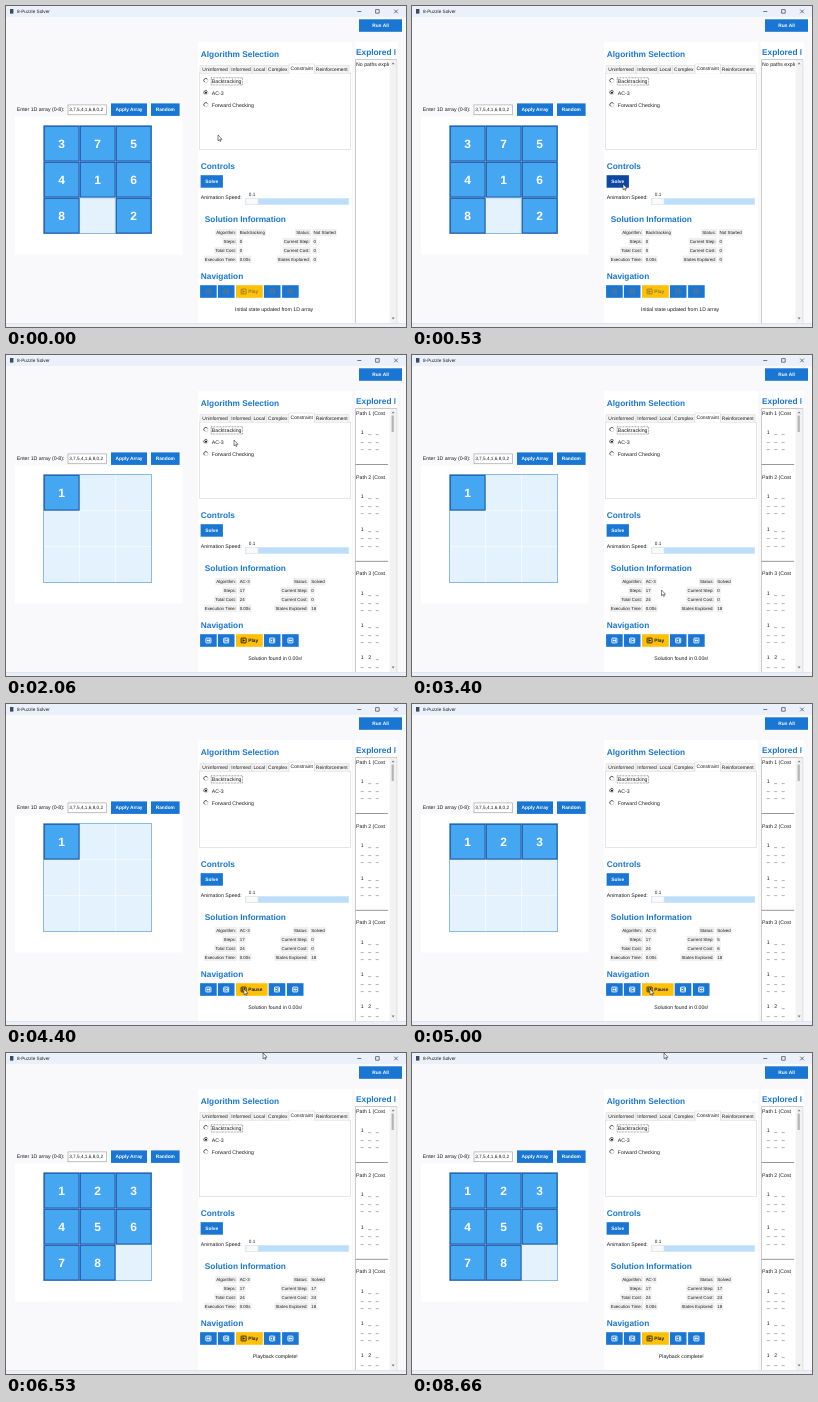
Recreate the animation shown at these times as an HTML page. Size 400 by 321 pixels, loop 8730 ms.

```html
<!DOCTYPE html>
<html lang="en">
<head>
<meta charset="utf-8">
<title>8-Puzzle Solver</title>
<style>
  html, body { margin: 0; width: 100%; height: 100%; overflow: hidden; background: #f9f9fc; }
  svg { display: block; width: 100vw; height: 100vh; }
  text { font-family: "Liberation Sans", Arial, sans-serif; font-size: 5.2px; fill: #1c1c1c;
         text-rendering: geometricPrecision; white-space: pre; }
  .head { font-size: 8.3px; font-weight: bold; fill: #1976d2; }
  .btn { font-size: 4.8px; font-weight: bold; fill: #fff; text-anchor: middle; }
  .tab { font-size: 4.9px; }
  .small { font-size: 4.7px; }
  .info { font-size: 4.4px; }
  .num { font-size: 12px; font-weight: bold; fill: #fff; text-anchor: middle; }
  .mid { text-anchor: middle; }
</style>
</head>
<body>
<svg id="stage" viewBox="0 0 400 321" preserveAspectRatio="none">
  <defs>
    <clipPath id="listClip"><rect x="349" y="36" width="34" height="281"/></clipPath>
    <clipPath id="headClip"><rect x="349" y="36" width="40.6" height="17"/></clipPath>
  </defs>
</svg>
<script>
const LOOP = 8730, TICK = 1000 / 15;
const SOLVED = 930, PLAY = 4400, LAST = 6400, DONE = 6500;
const BLUE = '#1976d2', NAVY = '#0d47a1', AMBER = '#ffc107';
const svg = document.getElementById('stage');

function el(name, attrs, parent = svg) {
  const node = document.createElementNS('http://www.w3.org/2000/svg', name);
  for (const key in attrs) node.setAttribute(key, attrs[key]);
  parent.appendChild(node);
  return node;
}
const group = (attrs = {}, parent = svg) => el('g', attrs, parent);
const rect = (x, y, width, height, fill, parent, extra = {}) =>
  el('rect', { x, y, width, height, fill, ...extra }, parent);
const path = (d, attrs, parent) => el('path', { d, fill: 'none', ...attrs }, parent);
function text(x, y, str, cls = '', parent) {
  const node = el('text', { x, y, class: cls }, parent);
  node.textContent = str;
  return node;
}
function setText(node, str) {
  if (node.textContent !== String(str)) node.textContent = str;
}
function show(node, on) { node.setAttribute('visibility', on ? 'visible' : 'hidden'); }
function shift(node, x, y = 0) { node.setAttribute('transform', `translate(${x} ${y})`); }
function button(x, y, w, label, h = 12.5) {
  const face = rect(x, y, w, h, BLUE);
  text(x + w / 2, y + h / 2 + 1.7, label, 'btn');
  return face;
}

// Window frame
rect(0, 0, 400, 321, '#f9f9fc');
rect(0, 0, 400, 11, '#eaf1fa');
rect(4, 3, 3.4, 4.6, '#3b4a5c');
text(11, 7.2, '8-Puzzle Solver', 'small');
path('M351.3 5.5h4M369.6 3.6h3.6v3.6h-3.6zM388.2 3.6l3.7 3.7m0 -3.7l-3.7 3.7',
  { stroke: '#333', 'stroke-width': 0.65 });
rect(0, 317.5, 400, 3.5, '#eaeff8');
rect(0, 317.2, 400, 0.7, '#d8dee8');
button(353, 13.3, 43, 'Run All');

// Left side
text(10.8, 105.4, 'Enter 1D array (0-8):');
rect(62, 98.9, 38.6, 9.8, '#fff', svg, { stroke: '#a8a8a8', 'stroke-width': 0.7 });
text(63.2, 105.3, '3,7,5,4,1,6,8,0,2', 'small');
rect(9, 110.5, 167.5, 138, '#fff');
button(105, 97.4, 36, 'Apply Array');
button(145, 97.4, 28.6, 'Random');

rect(37.6, 119.6, 108, 108, '#e3f2fd', svg, { stroke: '#74abdb', 'stroke-width': 0.8 });
path('M73.6 120v107.2M109.6 120v107.2M38 155.6h107.2M38 191.6h107.2',
  { stroke: '#f6fbff', 'stroke-width': 0.8 });
const tiles = Array.from({ length: 9 }, (_, i) => {
  const x = 38 + i % 3 * 36, y = 120 + Math.floor(i / 3) * 36;
  const g = group();
  rect(x + 0.3, y + 0.3, 34.8, 34.8, '#45a6f2', g, { stroke: '#1c56a8', 'stroke-width': 1.1 });
  return { g, label: text(x + 17.7, y + 21.9, '', 'num', g) };
});
const emptyEdge = path('M73.8 191.8h35.6v35.6', { stroke: '#74abdb', 'stroke-width': 0.7 });

// Algorithm panel
rect(192, 36, 154, 281, '#fff');
text(194.8, 50.5, 'Algorithm Selection', 'head');
rect(193.6, 67.3, 150.8, 76.2, '#fff', svg, { stroke: '#dadada', 'stroke-width': 0.7 });
const tabs = [[194, 30, 'Uninformed'], [224, 22, 'Informed'], [246, 14.5, 'Local'],
  [260.5, 22.5, 'Complex'], [283, 25.5, 'Constraint'], [308.5, 34.5, 'Reinforcement']];
for (const [x, w, name] of tabs) {
  const on = name === 'Constraint', top = on ? 58 : 59.6;
  rect(x, top, w, 67.3 - top + (on ? 0.5 : 0), on ? '#fff' : '#f4f4f4');
  path(`M${x} 67.3V${top}h${w}V67.3`, { stroke: '#dadada', 'stroke-width': 0.6 });
  text(x + w / 2, on ? 64.2 : 65, name, 'tab mid');
}
['Backtracking', 'AC-3', 'Forward Checking'].forEach((name, i) => {
  const y = 74.6 + i * 12.1;
  el('circle', { cx: 200, cy: y, r: 2, fill: '#fff', stroke: '#c8c8c8', 'stroke-width': 0.7 });
  path(`M201.4 ${y - 1.4}A2 2 0 1 0 198.6 ${y + 1.4}`, { stroke: '#444', 'stroke-width': 0.8 });
  if (i === 1) el('circle', { cx: 200, cy: y, r: 1.05, fill: '#111' });
  text(205.8, y + 2.3, name);
});
rect(205.2, 71.8, 31.4, 7.2, 'none', svg,
  { stroke: '#444', 'stroke-width': 0.6, 'stroke-dasharray': '0.8 0.7' });

// Controls
text(194.8, 163.4, 'Controls', 'head');
const solve = button(194.6, 169.2, 22.3, 'Solve');
text(194.8, 193.4, 'Animation Speed:');
text(242.8, 190, '0.1', 'small');
rect(239.6, 192.3, 103.2, 6.4, '#bbdefb', svg, { stroke: '#d3e6f5', 'stroke-width': 0.5 });
rect(240, 192.5, 12, 6, '#fafafa', svg, { stroke: '#dfe5ea', 'stroke-width': 0.6 });

// Solution information
text(198.8, 216.3, 'Solution Information', 'head');
function tag(x, y, right, parent) {
  const back = rect(x, y - 5.2, 0, 7.4, '#f0f0f0', parent);
  const node = text(x, y, '', 'info', parent);
  if (right) node.style.textAnchor = 'end';
  return str => {
    if (node.textContent === String(str)) return;
    node.textContent = str;
    const w = node.getComputedTextLength();
    back.setAttribute('width', w + 2);
    back.setAttribute('x', right ? x - w - 1 : x - 1);
  };
}
function column(x, names, parent) {
  return names.map((name, row) => {
    const y = 228.1 + row * 8.9;
    tag(x, y, true, parent)(name);
    return tag(x + 3.7, y, false, parent);
  });
}
const progress = group();
const fields = [
  ...column(230, ['Algorithm:', 'Steps:', 'Total Cost:', 'Execution Time:'], svg),
  ...column(303.8, ['Status:', 'Current Step:', 'Current Cost:', 'States Explored:'], progress)];

// Navigation
text(194.8, 273.3, 'Navigation', 'head');
const BACK = 'M1.6 -1.6v3.2L-0.3 0z', NEXT = 'M-1.6 -1.6v3.2L0.3 0z';
function boxed(x, d, parent) {
  const g = group({ transform: `translate(${x} 285.5)` }, parent);
  rect(-2.5, -2.4, 5, 4.8, 'none', g, { rx: 0.4, 'stroke-width': 0.9 });
  path(d, {}, g);
  return g;
}
function paint(g, color) {
  g.firstChild.setAttribute('stroke', color);
  g.lastChild.setAttribute('fill', color);
}
function navButton(x, d, parent) {
  rect(x - 8.3, 279.2, 16.6, 12.6, BLUE, parent);
  return boxed(x, d, parent);
}
const forward = group();
const navIcons = [
  navButton(202.4, BACK + 'M-0.2 -1.6v3.2L-1.9 0z', svg),
  navButton(220.2, BACK + 'M-1.6 -1.6h0.9v3.2h-0.9z', svg),
  navButton(266.2, NEXT + 'M0.7 -1.6h0.9v3.2h-0.9z', forward),
  navButton(284.4, NEXT + 'M0.2 -1.6v3.2L1.9 0z', forward)];
const playFace = rect(230, 279.2, 26.8, 12.6, AMBER);
const playIcon = boxed(237.6, '', svg);
const playText = text(242.2, 287.2, 'Play', 'btn');
playText.style.textAnchor = 'start';
const status = text(229, 304.6, '');

// Explored paths
rect(349, 36, 43, 281, '#fff');
text(350, 48.5, 'Explored Paths', 'head', group({ 'clip-path': 'url(#headClip)' }));
path('M349.5 317V53.5H390.8V317', { stroke: '#a8a8a8', 'stroke-width': 0.6 });
rect(383.6, 53.9, 6.9, 263, '#f2f2f2');
path('M385.6 58.2l1.5 -1.8 1.5 1.8zM385.6 311.6l1.5 1.8 1.5 -1.8z', { fill: '#777' });
const thumb = rect(385.6, 60.5, 2.2, 16.5, '#b4b4b4');
const list = group({ 'clip-path': 'url(#listClip)' });
const noPaths = text(350.1, 60, 'No paths explored yet', '', list);
const paths = group({}, list);
[[60, [79]], [124, [143, 175.6]], [220.4, [240, 272, 304]]].forEach(([y, states], i) => {
  text(350.1, y, `Path ${i + 1} (Cost`, '', paths);
  states.forEach((top, j) => {
    for (let k = 0; k < 9; k++) {
      const char = k === 0 ? '1' : k === 1 && j === 2 ? '2' : '_';
      text(356.3 + k % 3 * 7.4, top + Math.floor(k / 3) * 7.6, char, 'mid', paths);
    }
  });
});
for (const y of [109.1, 205.9]) rect(349.6, y, 32.5, 0.6, '#555', paths);

// Pointer
const pointer = path('M0 0V5.8L1.35 4.6 2.2 6.5 3 6.1 2.2 4.3H4Z',
  { fill: '#fff', stroke: '#222', 'stroke-width': 0.55, 'stroke-linejoin': 'round' });
const track = [ // time, x, y
  [0, 212, 129], [60, 212, 130], [260, 213, 146], [460, 211.5, 174], [530, 211, 178], [660, 211, 178],
  [1500, 211, 178], [1600, 212, 171], [1830, 212, 171], [1930, 218, 130], [2060, 228, 85],
  [2400, 230, 87], [2730, 236, 104], [2800, 237, 112], [3200, 249, 232], [3380, 249, 233],
  [3400, 249.5, 235], [3730, 238, 282], [3930, 238, 284], [4400, 238, 285], [5330, 238, 285],
  [5800, 250, 110], [6200, 257, 0], [7130, 257, 0], [7200, 257.5, 0], [7470, 257.5, 0], [7530, 265, 8],
  [7600, 262, 13], [7660, 244, 6], [7800, 246, 3], [8060, 252, 0], [LOOP, 252, 0]];
function pointerAt(t) {
  const i = Math.max(1, track.findIndex(p => p[0] > t));
  const [t0, x0, y0] = track[i - 1], [t1, x1, y1] = track[i];
  const k = (t - t0) / (t1 - t0);
  return [x0 + (x1 - x0) * k, y0 + (y1 - y0) * k];
}

function stepAt(t) {
  if (t >= LAST) return 17;
  return Math.max(0, Math.min(16, Math.floor((t - 4958) / 112.5) + 5));
}

function draw(t) {
  const solved = t >= SOLVED, playing = t >= PLAY && t < DONE;
  const step = stepAt(t);
  const cost = step + Math.max(0, Math.floor((step - 3) / 2));
  const count = Math.min(8, Math.floor(step / 2) + 1);
  const board = solved ? [1, 2, 3, 4, 5, 6, 7, 8].map(n => n <= count ? n : 0) : [3, 7, 5, 4, 1, 6, 8, 0, 2];
  tiles.forEach(({ g, label }, i) => {
    show(g, board[i]);
    setText(label, board[i] || '');
  });
  show(emptyEdge, !solved);

  const values = solved
    ? ['AC-3', 17, 24, '0.00s', 'Solved', step, cost, 18]
    : ['Backtracking', 0, 0, '0.00s', 'Not Started', 0, 0, 0];
  fields.forEach((set, i) => set(values[i]));
  shift(progress, solved ? -2.2 : 0);

  // The longer label widens its button and pushes the next two along.
  const grow = playing ? 4.8 : 0;
  playFace.setAttribute('width', 26.8 + grow);
  shift(forward, grow);
  navIcons.forEach(g => paint(g, solved ? '#fff' : '#5d7590'));
  const ink = solved ? '#1a1a1a' : '#8f7a35';
  paint(playIcon, ink);
  playIcon.lastChild.setAttribute('d', playing
    ? 'M-1.3 -1.4h0.9v2.8h-0.9zM0.4 -1.4h0.9v2.8h-0.9z' : 'M-1.1 -1.6v3.2L1.5 0z');
  playText.style.fill = ink;
  setText(playText, playing ? 'Pause' : 'Play');

  const [x, message] = !solved ? [229, 'Initial state updated from 1D array']
    : t < DONE ? [242.2, 'Solution found in 0.00s!'] : [246.8, 'Playback complete!'];
  status.setAttribute('x', x);
  setText(status, message);

  show(noPaths, !solved);
  show(paths, solved);
  show(thumb, solved);

  const [px, py] = pointerAt(Math.floor(t / TICK + 0.1) * TICK);
  shift(pointer, px, py);
  const hover = px > 194.5 && px < 217 && py > 169 && py < 182;
  solve.setAttribute('fill', hover ? NAVY : BLUE);
}

function frame() {
  draw(performance.now() % LOOP);
  requestAnimationFrame(frame);
}
frame();
</script>
</body>
</html>
```
